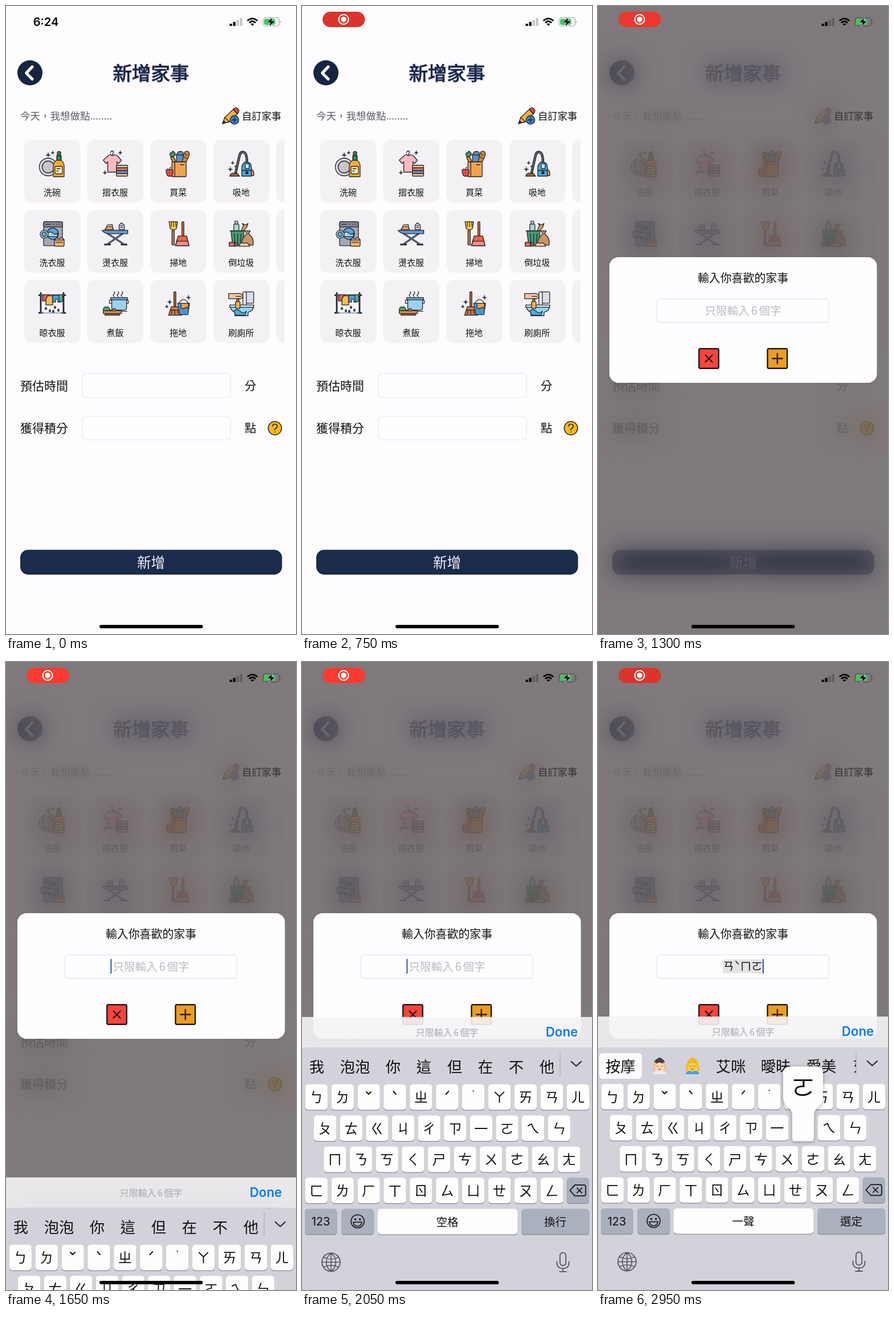
These frames come from a looping animation (509x1100 px, 3 s). An HTML page:

```html
<!DOCTYPE html>
<html lang="zh-Hant">
<head>
<meta charset="utf-8">
<style>
html, body { margin: 0; width: 100%; height: 100%; overflow: hidden; background: #fefcff; }
svg { display: block; width: 100vw; height: 100vh; }
text { font-family: "Noto Sans CJK TC", "Noto Sans CJK JP", "Noto Sans CJK", sans-serif; }
text:not(.latin) { font-weight: 350; }
.latin { font-family: Inter, "Liberation Sans", sans-serif; }
.icon { stroke: #25262f; stroke-width: 1.3; stroke-linejoin: round; stroke-linecap: round; fill: none; }
#blur { filter: blur(20px) saturate(1.6); }
#popup { filter: drop-shadow(0 1px 3px rgba(0,0,0,.35)); }
</style>
</head>
<body>
<svg id="stage" viewBox="0 0 509 1100"></svg>
<script>
const $ = id => document.getElementById(id);

// ---- drawing helpers (all return markup) ----
const rect = (x, y, w, h, fill, rx = 0, more = '') =>
  `<rect x="${x}" y="${y}" width="${w}" height="${h}" rx="${rx}" fill="${fill}" ${more}/>`;
const circle = (x, y, r, fill = 'none', more = '') =>
  `<circle cx="${x}" cy="${y}" r="${r}" fill="${fill}" ${more}/>`;
const path = (d, fill = 'none', more = '') => `<path d="${d}" fill="${fill}" ${more}/>`;
const line = (d, color, width) =>
  path(d, 'none', `stroke="${color}" stroke-width="${width}" stroke-linecap="round" stroke-linejoin="round"`);
const group = (x, y, body, more = '') => `<g transform="translate(${x} ${y})" ${more}>${body}</g>`;
// cy is the middle of the glyphs
const text = (s, x, cy, size, fill = '#111', anchor = 'middle', more = '') =>
  `<text x="${x}" y="${cy + size * .38}" font-size="${size}" fill="${fill}" text-anchor="${anchor}" ${more}>${s}</text>`;
const star = (x, y, r) => path(`M${x} ${y - r}Q${x} ${y} ${x + r} ${y}Q${x} ${y} ${x} ${y + r}Q${x} ${y} ${x - r} ${y}Q${x} ${y} ${x} ${y - r}Z`, '#25262f', 'stroke-width=".6"');

// ---- chore icons, each on a 47px square ----
const icons = {
  洗碗: circle(16, 29, 15.5, '#d9d7db') + circle(16, 29, 10.5, '#c6c5ca') +
    path('M25 46V28Q25 20 31 17H38Q44 20 44 28V46Z', '#f8ab2b') + rect(28, 28, 13, 13, '#f9e6bd', 2) +
    path('M31 32h6M31 36h3') + rect(31, 9, 8, 8, '#2d8c50', 1) + rect(32, 2, 6, 7, '#2d8c50', 2) +
    star(16, 8, 4) + star(24, 4, 3),
  摺衣服: path('M15 4Q15 1 18 1Q22 2 19 5L18 8') +
    path('M11 9L15 7Q18 11 22 7L26 9 34 17 29 23 26 20V38H10V20L7 23 2 17Z', '#f7bcc0') +
    rect(25, 26, 20, 4.5, '#f6c98d', 2) + rect(25, 30.5, 20, 5, '#d97c6b', 2) +
    rect(25, 35.5, 20, 5, '#6e9bd1', 2) + rect(25, 40.5, 20, 4.5, '#f6c98d', 2) + star(32, 4, 3.5) + star(5, 39, 3.5),
  買菜: path('M14 20Q7 11 12 11Q16 11 19 20', '#f08a32') + path('M10 11Q6 3 12 4Q13 -1 17 4Q20 9 14 11Z', '#479a57') +
    path('M20 20V7L24 2H30L33 7V20Z', '#5794c8') + path('M20 8H33') +
    path('M30 20L33 5Q36 0 41 2Q44 6 41 12L37 20Z', '#d88735') + path('M35 6l4 3M33 11l5 3') +
    rect(12, 20, 25, 26, '#f2a24d', 1) + path('M17 20V45M27 25h6') +
    path('M8 34Q1 30 2 38Q4 47 8 45Q13 47 14 38Q14 31 8 34Z', '#e54a3f') + path('M8 34Q8 31 10 29'),
  吸地: line('M13 40L20 9Q22 2 27 3Q33 4 33 20', '#25262f', 4.5) + line('M13 40L20 9Q22 2 27 3Q33 4 33 20', '#6d6a75', 1.8) +
    path('M3 45Q4 40 9 40H16L20 45Z', '#a9623b') + path('M24 45V29Q26 20 33 20Q41 21 41 31V45Z', '#4ba4da') +
    rect(30, 23, 7, 9, '#bfe2f4', 2) + path('M41 33Q46 35 45 44H41Z', '#e79b4c') + circle(33, 39, 2, '#25262f') +
    path('M24 35H41') + star(8, 22, 3) + star(4, 33, 4) + circle(13, 28, .8),
  洗衣服: rect(8, 2, 33, 42, '#a5a8b4', 2) + rect(8, 2, 33, 9, '#858895', 2) + path('M12 6.5h8M25 6.5h1M30 6.5h1M35 6.5h1') +
    circle(24, 23, 10, '#5aa8d8') + path('M15 22Q20 18 24 22T33 22L32 28H16Z', '#a6dcf0') +
    circle(9, 24, 7, '#c4e8f5') + circle(9, 24, 4.2, '#5aa8d8') + rect(27, 32, 17, 13, '#efb065', 2) +
    path('M27 34Q31 28 35 32Q40 27 44 34Z', '#f4a3a2') + path('M30 38h11'),
  燙衣服: path('M10 23L39 42M36 23L9 42M5 42h9M34 42h9', 'none', 'stroke="#25262f" stroke-width="3"') +
    path('M10 23L39 42M36 23L9 42', 'none', 'stroke="#7b99c8" stroke-width="1"') +
    path('M0 17H45V23H13Q4 23 0 17Z', '#5f9ad6') + path('M5 16Q7 10 13 10H18L20 16Z', '#e49c60') + path('M8 10Q9 6 18 7V10') +
    path('M30 16V8L34 4L39 8V16Z', '#c9cad4') + path('M33 9h3M33 12h3'),
  掃地: path('M7 2H22L20 14Q15 19 9 14Z', '#f9cf4e') + path('M11 2v9M15 2v9M19 2v8') + rect(12, 17, 4, 26, '#d5773c', 2) +
    rect(29.5, 2, 3.5, 25, '#d5773c', 1.5) + path('M23 27H38L42 44H18Z', '#ed6250') + path('M21 36H40L42 44H18Z', '#f28b79'),
  倒垃圾: rect(10, 6, 9, 13, '#a8d8c6', 2) + rect(12, 1, 5, 5, '#d5d5dc', 1) + path('M23 18L27 9L25 5L31 8L35 5L33 11L27 18Z', '#e5a354') +
    path('M5 18H28L26 44H8Z', '#459c74') + path('M3 18h27') + path('M11 23l1 16M17 23v16M23 23l-1 16') +
    path('M33 23L30 18H39L36 23Q46 31 44 43H23Q24 30 33 23Z', '#c99463') + path('M19 45Q22 36 28 40Q34 36 38 45Z', '#f2cb9b') +
    path('M2 45V38H11V45Z', '#e26c5b') + circle(14, 42, 3, '#c94f44'),
  晾衣服: path('M3 4V39M43 4V39M0 39h6M40 39h6M0 8H46', 'none', 'stroke-width="2.8"') +
    path('M3 39H43M3 8H43', 'none', 'stroke="#6c87a7" stroke-width="1.2"') +
    path('M6 7H18V18H6Z', '#df5c52') + path('M15 9H24V25H12V15Z', '#f8bd48') + path('M24 8H38V20H33V15H29V20H24Z', '#4f9dd0') +
    path('M35 7H41V19H36Z', '#65b996') + [[12, 29], [19, 33], [28, 27], [34, 32], [25, 34]].map(p => path(`M${p}l-1.5 3q1.5 2 3 0z`, '#67bce7')).join(''),
  煮飯: [21, 28, 35].map(x => path(`M${x} 2q3 2 0 4t0 4`)).join('') + path('M17 17H13V22H17M43 17H46V22H43') +
    path('M17 15H43V30Q43 34 39 34H21Q17 34 17 30Z', '#9ad2f1') + rect(15, 12, 30, 4, '#6caad5', 2) +
    path('M2 35H34V40H2Z', '#dc8e49') + path('M34 36h10') + path('M2 35Q2 27 8 29Q12 26 14 35Z', '#53a365') +
    path('M14 35L22 31 26 35Z', '#f19444') + rect(5, 40, 26, 3, '#a55f39'),
  拖地: rect(15.5, 2, 3.5, 26, '#be6a3d', 1) + path('M11 28H24L29 43H6Z', '#ce7c46') + path('M9 34H26M12 35l-1 7M17 35v7M22 35l1 7') +
    path('M24 22Q32 9 41 22') + path('M22 22H43L40 42H26Z', '#4895d2') + path('M28 22H41V31L37 29 33 32 28 30Z', '#f3a23e') +
    star(41, 12, 4) + star(8, 20, 4) + star(3, 28, 3),
  刷廁所: rect(29, 2, 16, 20, '#dbdce5', 2) + rect(26, 2, 6, 24, '#f1f1f5', 2) +
    path('M3 25H45Q45 36 35 38V44H12V38Q4 35 3 25Z', '#8fd5ee') + path('M3 25H45V29H3Z', '#dbeef6') +
    path('M10 36Q16 30 21 36T32 36L30 43H13Z', '#4fa9dc') + rect(15, 12, 4, 12, '#cc7b3e', 1) + rect(13, 19, 8, 12, '#ecae50', 2) +
    path('M1 5H15Q25 4 26 10Q25 15 19 14H1Z', '#f3c49d') + path('M14 10h9')
};
const names = Object.keys(icons);

// ---- the form page ----
const cards = [0, 1, 2].map(row => [0, 1, 2, 3, 4].map(col => {
  const x = 32 + col * 110.6, y = 234.5 + row * 122.8, name = names[row * 4 + col];
  return rect(x, y, 98.5, 110, '#f4f1f4', 13) + (col < 4
    ? group(x + 26, y + 18.5, icons[name], 'class="icon"') + text(name, x + 49, y + 92, 15) : '');
}).join('')).join('');

const field = (label, unit, y) => text(label, 25, y, 21, '#111', 'start') + text(unit, 429, y, 20.5) +
  rect(134.5, y - 21, 259.5, 41.5, '#fffeff', 6, 'stroke="#e7e5ee" stroke-width="1.2"');

const pencil = path('M380 206L384 195L399 181L406 189L392 203Z', '#f8b03a') + path('M384 195L392 203') +
  path('M380 206L382 201L385 204Z', '#25262f') + path('M399 181Q403 176 407 180Q411 184 406 189Z', '#e9483e') +
  circle(401, 199.5, 7.5, '#2e83d4') + path('M397 199.5h8M401 195.5v8');

const page = rect(0, 0, 509, 1100, '#fefcff') + circle(42, 117, 22, '#172443') + line('M46 106.5L35.5 117.5L46 128', '#fff', 5.2) +
  text('新增家事', 254.5, 117, 33.4, '#1b2950', 'middle', 'stroke="#1b2950" stroke-width="1.2"') +
  text('今天，我想做點........', 25, 192.5, 17.5, '#5d5b60', 'start') + `<g class="icon">${pencil}</g>` +
  `<g clip-path="url(#cards)">${cards}</g>` + field('預估時間', '分', 665) + field('獲得積分', '點', 739.5) +
  circle(472, 739.5, 11.7, '#fdb813', 'stroke="#28262b" stroke-width="1.6"') +
  line('M468 736Q468 732.5 472 732.5Q476 732.5 476 736Q476 738.5 472 741V742.5M472 746v.2', '#28262b', 1.7) +
  rect(25, 952.5, 459.5, 43.5, '#1b2b4b', 14) + text('新增', 254.5, 975, 24.5, '#f4f3f8');

// ---- status bar ----
const status = [0, 1, 2, 3].map(i => rect(392.5 + i * 6, 31 - i * 3.3, 4.4, 4 + i * 3.3, i < 2 ? '#000' : 'rgba(0,0,0,.22)', 1)).join('') +
  line('M424.5 25.2Q432.5 18.5 440.5 25.2M427.8 28.8Q432.5 24.8 437.2 28.8', '#000', 2.8) + path('M429.5 31.6Q432.5 29.3 435.5 31.6L432.5 34.8Z', '#000') +
  rect(451, 20.5, 28.5, 14.5, 'none', 4.5, 'stroke="rgba(0,0,0,.4)" stroke-width="1.1"') + rect(453, 22.5, 19.5, 10.5, '#3cca60', 2.5) +
  path('M481 25.5q2.4 2.2 0 4.6z', 'rgba(0,0,0,.4)') +
  path('M467.5 20L458 29h6L462 36 472.5 26.2h-6.2Z', '#000', 'stroke="#fff" stroke-width=".6"');

// ---- dialog ----
const hint = (y, size, fill) => text(`只限輸入<tspan dx="${size * .14}">6</tspan><tspan dx="${size * .14}">個字</tspan>`, 254.5, y, size, fill);
const button = (x, fill, mark) => rect(x - 17.3, 600.2, 34.6, 34.6, fill, 2.5, 'stroke="#1c1b22" stroke-width="2.4"') + line(mark, '#1c1b22', 2.3);
const dialog = rect(20, 440, 469.5, 220, '#fefdff', 16) + text('輸入你喜歡的家事', 254.5, 476, 19.9) +
  rect(103.5, 513, 302, 41, '#fefdff', 5, 'stroke="#e8e6ee" stroke-width="1.3"') + '<g id="entry"></g>' +
  button(194.5, '#fb4439', 'M188.5 611.5l12 12M200.5 611.5l-12 12') + button(314.8, '#ec9d22', 'M306 617.5h17.6M314.8 608.7v17.6');

// ---- keyboard, drawn from the top of its accessory bar ----
const rows = ['ㄅㄉˇˋㄓˊ˙ㄚㄞㄢㄦ', 'ㄆㄊㄍㄐㄔㄗ一ㄛㄟㄣ', 'ㄇㄋㄎㄑㄕㄘㄨㄜㄠㄤ', 'ㄈㄌㄏㄒㄖㄙㄩㄝㄡㄥ⌫'];
const ends = [[25.2, 484.3], [40.6, 451.2], [57.8, 468.6], [25.2, 484.3]];
const tones = { 'ˇ': 'M-4 -3L0 1L4 -3', 'ˋ': 'M-2.5 -4L2 1', 'ˊ': 'M2.5 -4L-2 1', '˙': 'M0 -5v.5' };
const keyX = (row, col) => ends[row][0] + (ends[row][1] - ends[row][0]) * col / (rows[row].length - 1);
const keyY = row => 118 + row * 54.5;
const glyph = (c, x, y, size) => tones[c] ? group(x, y - size * .26, line(tones[c], '#111', size / 12)) : text(c, x, y, size);
const key = (x, y, w, fill = '#fefefe') => rect(x, y + 1.3, w, 44.7, '#898b91', 5.5) + rect(x, y, w, 44.7, fill, 5.5);
const grey = '#abb0bf';

const letters = rows.map((chars, row) => [...chars].map((c, col) => {
  const x = keyX(row, col), y = keyY(row);
  return c === '⌫'
    ? key(x - 19.6, y, 39.3, grey) + line(`M${x - 14} ${y + 22.3}l8.5-9.5h16q3 0 3 3v13q0 3-3 3h-16zM${x - 1.5} ${y + 18}l8.5 8.5m0-8.5l-8.5 8.5`, '#111', 1.7)
    : key(x - 19.6, y, 39.3) + glyph(c, x, y + 22.5, 24);
}).join('')).join('');

const low = keyY(4);
const keyboard = rect(0, 54, 509, 546, '#d2d3da') + rect(0, 0, 509, 54, 'rgba(246,243,247,.9)') + hint(27, 16, '#aaa8ad') +
  text('Done', 456, 26, 22.3, '#087cf2', 'middle', 'class="latin" font-weight="600"') +
  '<g id="words" clip-path="url(#words-clip)"></g>' + line('M453 62V103', '#a9abb3', 1.1) + line('M472.5 78l8.8 8 8.8-8', '#222', 2) +
  letters + key(5, low, 56.5, grey) + text('123', 33, low + 22, 20, '#111', 'middle', 'class="latin"') +
  key(69.3, low, 57, grey) + circle(97.6, low + 22, 11.5, 'none', 'stroke="#111" stroke-width="1.6"') +
  circle(93.5, low + 18.5, 1.7, '#111') + circle(101.7, low + 18.5, 1.7, '#111') + path(`M90 ${low + 23.5}h15.2q-1.5 7-7.6 7t-7.6-7z`, 'none', 'stroke="#111" stroke-width="1.5"') +
  key(133, low, 245) + key(385, low, 119.3, grey) + '<g id="labels"></g>' +
  group(51, 429.5, line('M-16 0H16M0 -16V16M-13 -8.5Q0 -2.5 13 -8.5M-13 8.5Q0 2.5 13 8.5M0 -16C-11 -8 -11 8 0 16C11 8 11 -8 0 -16', '#55565c', 1.6) + circle(0, 0, 16, 'none', 'stroke="#55565c" stroke-width="1.7"')) +
  group(458, 429.5, rect(-5.2, -17, 10.4, 23, 'none', 5.2, 'stroke="#55565c" stroke-width="1.8"') + line('M-10.5 -1V2Q-10 11 0 11Q10 11 10.5 2V-1M0 11V16.5M-6 16.5H6', '#55565c', 1.8)) +
  '<g id="popup"></g>';

$('stage').innerHTML = `<defs><clipPath id="cards"><path d="M0 220H489V610H0Z"/></clipPath>
  <clipPath id="words-clip"><path d="M0 55H453V117H0Z"/></clipPath></defs>
  ${page}<g id="blur">${page}</g><g id="custom">${text('自訂家事', 448.5, 192.5, 17.3)}</g>
  ${rect(0, 0, 509, 1100, '#3b3437', 0, 'id="dim"')}${status}
  <g id="clock">${text('6:24', 70, 27.5, 20, '#000', 'middle', 'class="latin" font-weight="600"')}</g>
  <g id="pill">${rect(36, 10, 74.5, 27, '#fd3b31', 13.5, 'id="pill-bg"')}${circle(73, 23.5, 8.6, 'none', 'stroke="#fff" stroke-width="2"')}${circle(73, 23.5, 4.8, '#fff')}</g>
  <g id="dialog">${dialog}</g><g id="keyboard">${keyboard}</g>${rect(164, 1084, 181.5, 6, '#000', 3)}`;

// ---- typing ----
const presses = [[2300, 0, 9], [2480, 0, 3], [2700, 2, 0], [2870, 1, 7]];
const focusAt = 1573.5;

const face = (x, hair, skin, hands, shirt) => group(x, 87, path('M-12 14Q-11 7 0 7Q11 7 12 14Z', shirt) +
  circle(0, -4, 10, hair) + circle(0, -11, 4, hair) + circle(0, 1, 8.5, skin) + path('M-8 -3Q0 -10 8 -3L6 -8H-6Z', hair) +
  line('M-5 0q1.5 1.5 3 0M2 0q1.5 1.5 3 0M-2.5 5q2.5 1.5 5 0', '#6a4632', 1) +
  path('M-13 8L-10 -6Q-7 -9 -6 -5L-9 9ZM13 8L10 -6Q7 -9 6 -5L9 9Z', hands));

function words(n) {
  const pill = w => rect(2, 64, w, 45, '#fbfafc', 6);
  const put = (list, xs) => list.map((w, i) => text(w, xs[i], 87, 26.3)).join('');
  if (n > 2) return pill(75) + put(['按摩', '艾咪', '曖昧', '愛美', 'ㄞ'], [39.5, 233, 312, 392, 460]) +
    face(108, '#4b3a39', '#ffd9b8', '#f2bd95', '#eeeaf0') + face(166, '#f2b41f', '#ffd23f', '#f7bb26', '#4b9ce0');
  if (n) return pill(48) + put([...(n > 1 ? '按案暗岸黯闇犴豻' : '安按案暗岸俺庵鞍')], [0, 1, 2, 3, 4, 5, 6, 7].map(i => 26 + 54 * i));
  return put(['我', '泡泡', '你', '這', '但', '在', '不', '他'], [26, 93, 160, 214, 268, 322, 376, 430]);
}

function entry(n, focused) {
  const cursor = x => rect(x, 520, 2.2, 26, '#3564c8', 1);
  if (!n) return hint(533.5, 19.6, '#bcbac0') + (focused ? cursor(183.3) : '');
  const chars = presses.slice(0, n).map(p => rows[p[1]][p[2]]);
  const widths = chars.map(c => tones[c] ? 11 : 19.3), total = widths.reduce((a, b) => a + b);
  let x = 254 - total / 2, out = rect(x - .5, 521, total + 1, 24, '#e5e3e6', 3);
  chars.forEach((c, i) => { out += glyph(c, x + widths[i] / 2, 533, 19.3); x += widths[i]; });
  return out + cursor(x + .4);
}

function popup(press) {
  if (!press) return '';
  const [, row, col] = press;
  return group(keyX(row, col), keyY(row),
    path('M-35 -73q0-12 12-12h46q12 0 12 12v42c0 18-16 16-16 32v40q0 5-5 5h-28q-5 0-5-5v-40c0-16-16-14-16-32z', '#fefefe') +
    glyph(rows[row][col], 0, -49, 41));
}

let shown = '';
function showText(t) {
  const n = presses.filter(p => t >= p[0]).length, focused = t >= focusAt;
  const active = presses.find(p => t >= p[0] && t < p[0] + 130);
  const state = [n, focused, !!active].join();
  if (state === shown) return;
  shown = state;
  $('words').innerHTML = words(n);
  $('entry').innerHTML = entry(n, focused);
  $('popup').innerHTML = popup(active);
  $('labels').innerHTML = text(n % 2 || n > 2 ? '一聲' : '空格', 255, low + 23, 19.5) + text(n ? '選定' : '換行', 444.5, low + 23, 19.5);
}

// ---- motion ----
const clamp = v => Math.max(0, Math.min(1, v));
const set = (id, name, value) => $(id).setAttribute(name, value);

function draw() {
  const t = performance.now() % 3000;

  const record = clamp((t - 200) / 200);
  set('clock', 'opacity', 1 - record);
  set('pill', 'opacity', record);
  const glow = .5 + .5 * Math.cos((t - 1850) / 2100 * 2 * Math.PI);
  set('pill-bg', 'fill', `rgb(${220 + 35 * glow},${52 + 7 * glow},${43 + 6 * glow})`);

  const open = 1 - (1 - clamp((t - 765) / 163)) ** 3;
  set('blur', 'opacity', .72 * open);
  set('custom', 'opacity', 1 - .1 * open);
  set('dim', 'opacity', .65 * open);
  set('dialog', 'opacity', Math.min(1, open * 1.09));
  set('dialog', 'transform', `translate(254.5 550) scale(${.48 + .52 * open}) translate(-254.5 -550)`);

  // critically damped spring
  const u = Math.max(0, t - focusAt) * .0182;
  set('keyboard', 'transform', `translate(0 ${621 + 479 * (1 + u) * Math.exp(-u)})`);

  showText(t);
  requestAnimationFrame(draw);
}
draw();
</script>
</body>
</html>
```
